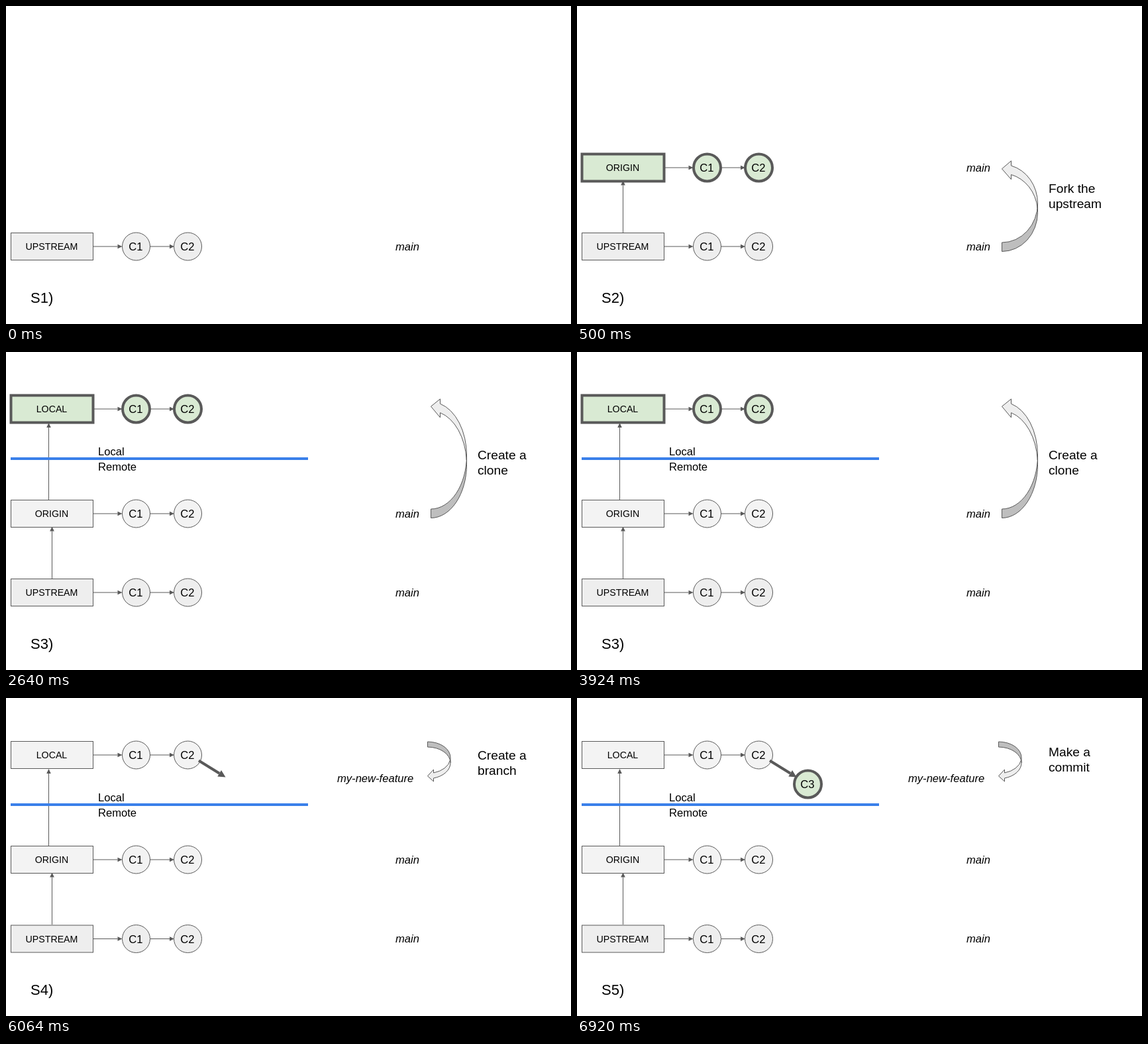
An HTML page that plays this animation: 853x480 px, repeating every 8000 ms.

```html
<!DOCTYPE html>
<html lang="en">
<head>
<meta charset="utf-8">
<title>Fork, clone, branch, commit</title>
<style>
html, body { margin: 0; width: 100%; height: 100%; overflow: hidden; background: #fff; }
svg { display: block; width: 853px; height: 480px; font-family: "Liberation Sans", Arial, sans-serif; }
.thin { stroke: #595959; stroke-width: 1; }
.bold { stroke: #595959; stroke-width: 4; fill: #d9ead3; }
.mid { text-anchor: middle; }
</style>
</head>
<body>
<svg id="stage" viewBox="0 0 853 480"></svg>
<script>
const stage = document.getElementById('stage');
const GREY = '#595959';

const text = (x, y, size, str, extra = '') =>
  `<text x="${x}" y="${y}" font-size="${size}" ${extra}>${str}</text>`;

const note = (x, y, str) => text(x, y, 16.6, str, 'font-style="italic"');

// Straight arrow with a filled head of the given length and half width
function arrow(x1, y1, x2, y2, width = 1, len = 7, half = 3.3) {
  const d = Math.hypot(x2 - x1, y2 - y1);
  const ux = (x2 - x1) / d, uy = (y2 - y1) / d;
  const bx = x2 - ux * len, by = y2 - uy * len;
  return `<path d="M${x1} ${y1}L${bx} ${by}" stroke="${GREY}" stroke-width="${width}"/>` +
    `<path d="M${x2} ${y2}L${bx - uy * half} ${by + ux * half}L${bx + uy * half} ${by - ux * half}Z" fill="${GREY}"/>`;
}

const look = (fill, hot) => hot ? 'class="bold"' : `class="thin" fill="${fill}"`;

function commit(x, y, name, fill, hot) {
  return `<circle cx="${x}" cy="${y}" r="${hot ? 20.5 : 21}" ${look(fill, hot)}/>` +
    text(x - 0.7, y + 6, 16.6, name, 'class="mid"');
}

function repo(name, y, fill, hot) {
  return arrow(132, y, 175.5, y) + arrow(218, y, 254, y) +
    `<rect x="7.5" y="${y - 20.5}" width="124" height="41" ${look(fill, hot)}/>` +
    text(69, y + 5, 14.2, name, 'class="mid"') +
    commit(196.5, y, 'C1', fill, hot) + commit(274.5, y, 'C2', fill, hot);
}

// Bent arrow from a tail at (x, y); dir is -1 for up and 1 for down
function bend(x, y, dir, rx, ry, band, head) {
  const far = x + rx, neck = x + head;
  const c1 = y + dir * ry, c2 = c1 - dir * -band;
  const mid = (c1 + c2) / 2;
  const k = Math.sqrt(1 - (head / rx) ** 2) * ry * dir;
  const out = dir > 0 ? 1 : 0;
  const meet = x + rx * Math.sqrt(1 - (band / 2 / ry) ** 2);
  const arc = (sweep, px, py) => `A${rx} ${ry} 0 0 ${sweep} ${px} ${py}`;
  const tail = `M${x} ${y}${arc(out, far, c1)}L${far} ${c2}${arc(1 - out, x, y + dir * band)}Z`;
  const tip = `M${x} ${mid + dir * ry}L${neck} ${mid + k - head}V${mid + k + head}` ;
  const ends = dir > 0 ? [c2, c1] : [c2, c1];
  const point = `M${x} ${mid + dir * ry}L${neck} ${mid + k + dir * head}V${ends[0] + k}` +
    `${arc(1 - out, far, ends[0])}${arc(1 - out, meet, mid)}` +
    `${arc(out, neck, ends[1] + k)}V${mid + k - dir * head}Z`;
  return `<path d="${tail}" class="thin" fill="#bebebe"/><path d="${point}" class="thin" fill="#eee"/>`;
}

const label = (y, a, b) => text(712, y, 19.2, a) + text(712, y + 23, 19.2, b);
const upstream = y => repo('UPSTREAM', y, '#eee') + note(588, 369, 'main');
const origin = hot => arrow(69.5, 342, 69.5, 263.5) +
  repo('ORIGIN', 244, '#f3f3f3', hot) + note(588, 250, 'main');
const local = hot => arrow(64.5, 223, 64.5, 107) +
  '<path d="M7 161H456" stroke="#3a80ea" stroke-width="4"/>' +
  text(139, 156, 16.6, 'Local') + text(139, 179, 16.6, 'Remote') +
  repo('LOCAL', 86, '#f3f3f3', hot);
const branch = () => upstream(363.5) + origin() + local() +
  arrow(291, 94.5, 331.5, 119.5, 4, 11, 5.5) +
  note(500, 127, 'my-new-feature') + bend(636.5, 66, 1, 34.5, 23.9, 8, 9);

const steps = [
  [0, () => upstream(363)],
  [500, () => upstream(363) + origin(true) + bend(641.5, 370.5, -1, 54, 59, 13.5, 14) +
    label(282, 'Fork the', 'upstream')],
  [2640, () => upstream(363) + origin() + local(true) + bend(641.5, 250.5, -1, 54, 80.8, 13.5, 14) +
    label(162, 'Create a', 'clone')],
  [4780, () => branch() + label(93, 'Create a', 'branch')],
  [6920, () => branch() + commit(348.5, 130, 'C3', '', true) + label(88, 'Make a', 'commit')]
];

const LOOP = 8000;
const start = performance.now();
let shown = -1;

function tick() {
  const t = (performance.now() - start) % LOOP;
  const i = steps.filter(s => s[0] <= t).length - 1;
  if (i !== shown) {
    shown = i;
    stage.innerHTML = steps[i][1]() + text(37, 448, 22, `S${i + 1})`);
  }
  requestAnimationFrame(tick);
}
tick();
</script>
</body>
</html>
```
